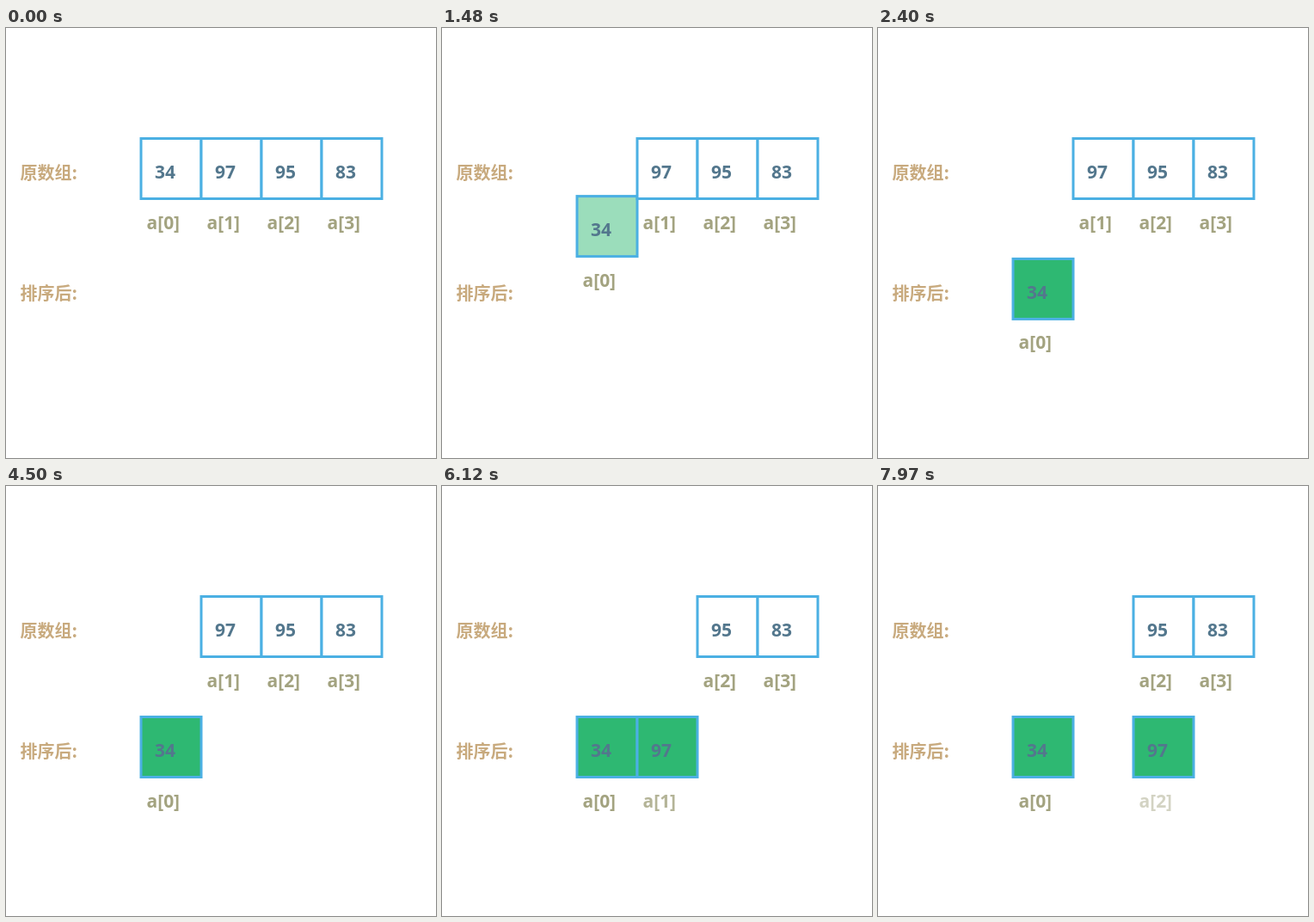
Animation, 500 px wide and 500 px high, one loop 8000 ms. Source, as an HTML page:

```html
<!DOCTYPE html>
<html lang="zh">
<head>
<meta charset="utf-8">
<title>插入排序</title>
<style>
  html, body { margin: 0; width: 100%; height: 100%; overflow: hidden; background: #fff; }
  svg { display: block; width: 100vw; height: 100vh; }
  rect { stroke: #4bb0e3; stroke-width: 3; }
  text { font: bold 21px "Open Sans", "Noto Sans", sans-serif; }
  .title { font: bold 20px "Noto Sans CJK SC", "Noto Sans CJK", sans-serif; fill: #c8aa7e; }
  .value { fill: #53778d; }
  .index { fill: #a3a380; }
</style>
</head>
<body>
<svg id="stage" viewBox="0 0 500 500">
  <text class="title" x="16.5" y="175.5">原数组:</text>
  <text class="title" x="16.5" y="315.5">排序后:</text>
</svg>
<script>
const LOOP = 8000, CELL = 70, DROP = 140;
const LEFT = 157, TOP = 128.5;
const WHITE = [255, 255, 255], GREEN = [46, 184, 114];
const stage = document.getElementById('stage');

function add(parent, tag, attrs, text = '') {
  const el = document.createElementNS('http://www.w3.org/2000/svg', tag);
  for (const key in attrs) el.setAttribute(key, attrs[key]);
  el.textContent = text;
  parent.appendChild(el);
  return el;
}

const cells = [34, 97, 95, 83].map((value, i) => {
  const group = add(stage, 'g', {});
  const box = add(group, 'rect', { x: 0, y: 0, width: CELL, height: CELL, fill: '#fff' });
  add(group, 'text', { class: 'value', x: 16, y: 46.5 }, value);
  const label = add(group, 'text', { class: 'index', x: 6.5, y: 105 }, `a[${i}]`);
  return { group, box, label };
});

// Cubic in-out progress of a step that begins at start
function ease(t, start, length = 1000) {
  const u = Math.min(1, Math.max(0, (t - start) / length));
  return u < 0.5 ? 4 * u ** 3 : 1 - 4 * (1 - u) ** 3;
}

function place(i, drop, shift = 0) {
  const { group, box } = cells[i];
  const x = LEFT + CELL * (i + shift), y = TOP + DROP * drop;
  group.setAttribute('transform', `translate(${x.toFixed(2)} ${y.toFixed(2)})`);
  const rgb = WHITE.map((c, k) => Math.round(c + (GREEN[k] - c) * drop));
  box.setAttribute('fill', `rgb(${rgb})`);
}

function render(t) {
  const drop = ease(t, 4482), settle = ease(t, 5482);
  const shift = ease(t, 6482), relabel = ease(t, 7482);
  place(0, ease(t, 495, 2000));
  place(1, drop, shift);
  place(2, 0);
  place(3, 0);
  const { label } = cells[1];
  label.textContent = t < 7482 ? 'a[1]' : 'a[2]';
  label.setAttribute('opacity', (1 - drop + settle - shift + relabel).toFixed(3));
}

const begin = performance.now();
function tick() {
  render((performance.now() - begin) % LOOP);
  requestAnimationFrame(tick);
}
tick();
</script>
</body>
</html>
```
